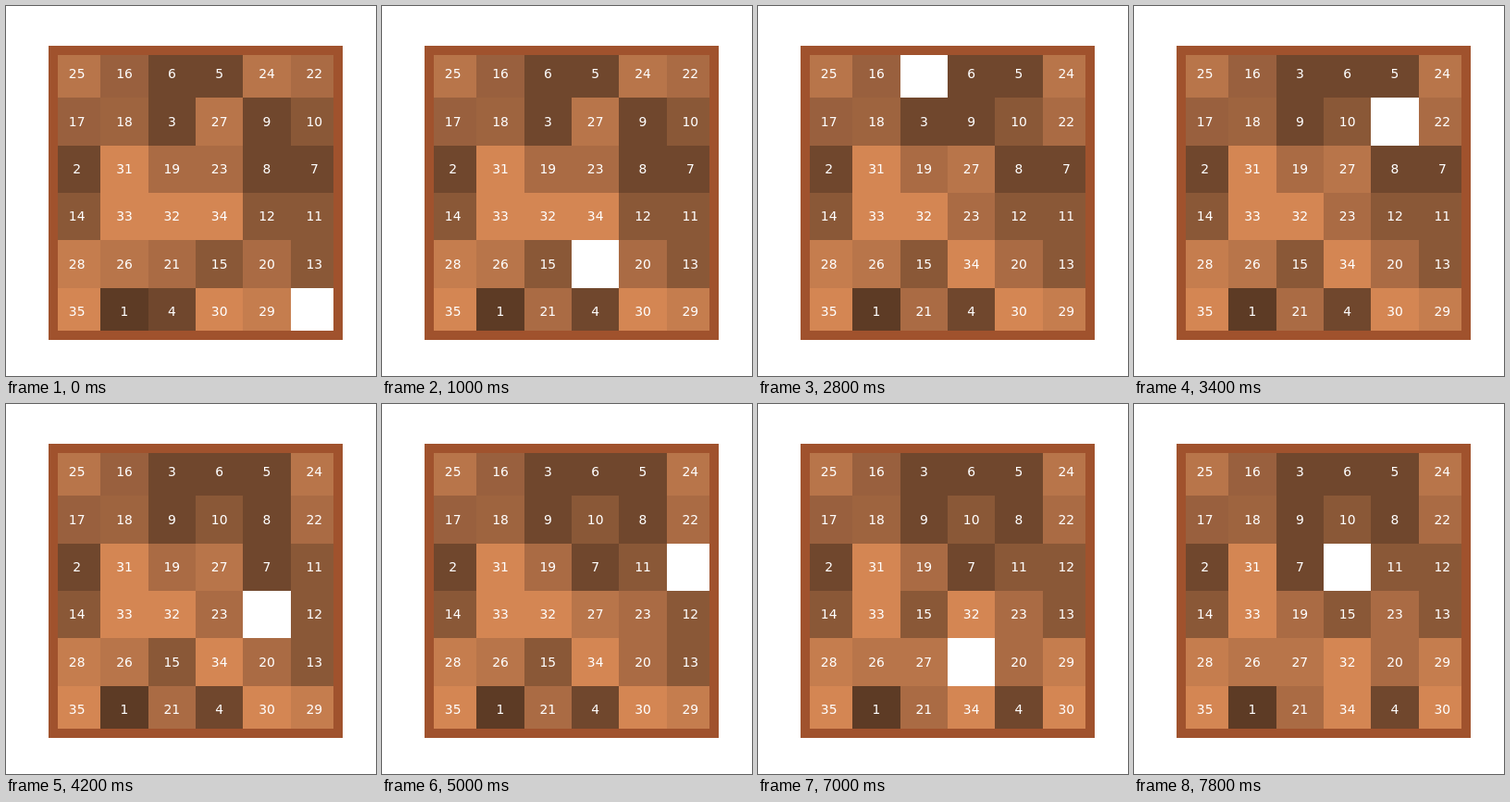
Recreate the animation shown at these times as an HTML page. Size 400 px wide and 400 px high, loop 8000 ms.

```html
<!DOCTYPE html>
<html lang="en">
<head>
<meta charset="utf-8">
<title>Sliding puzzle</title>
<style>
  html, body { margin: 0; width: 100%; height: 100%; overflow: hidden; background: #fff; }
  svg { display: block; width: 100%; height: 100%; }
  rect { shape-rendering: crispEdges; }
  text { font: 13.89px "DejaVu Sans", sans-serif; fill: #fff; text-anchor: middle; }
</style>
</head>
<body>
<svg viewBox="0 0 400 400">
  <g id="tiles"></g>
  <rect x="51" y="48" width="308" height="308" fill="none" stroke="#a0522d" stroke-width="10"/>
</svg>
<script>
const SIZE = 6, LEFT = 51, TOP = 48, PITCH = 308 / SIZE;
const STEP = 200, LOOP = 8000;
const START = [
  25, 16, 6, 5, 24, 22,
  17, 18, 3, 27, 9, 10,
  2, 31, 19, 23, 8, 7,
  14, 33, 32, 34, 12, 11,
  28, 26, 21, 15, 20, 13,
  35, 1, 4, 30, 29, 0
];
// Directions in which the gap travels
const MOVES = 'LLLURUUURRULLLDRRDRDLLURRDDDLLUULDRULUR';
const OFFSET = { L: -1, R: 1, U: -SIZE, D: SIZE };
// Highest number of each shade
const SHADES = [
  [1, '#5d3b25'], [9, '#70472d'], [15, '#8a5837'], [17, '#99603e'], [18, '#9e643f'],
  [23, '#aa6b44'], [27, '#b8754a'], [29, '#c57d4e'], [35, '#d48653']
];

const boards = [START];
for (const move of MOVES) {
  const board = boards[boards.length - 1].slice();
  const gap = board.indexOf(0), next = gap + OFFSET[move];
  board[gap] = board[next];
  board[next] = 0;
  boards.push(board);
}

function add(parent, name, attrs) {
  const node = document.createElementNS('http://www.w3.org/2000/svg', name);
  for (const key in attrs) node.setAttribute(key, attrs[key]);
  return parent.appendChild(node);
}

const layer = document.getElementById('tiles');
const cells = START.map((_, i) => {
  const col = i % SIZE, row = Math.floor(i / SIZE);
  const x = Math.round(LEFT + col * PITCH), y = Math.round(TOP + row * PITCH);
  return {
    tile: add(layer, 'rect', {
      x, y,
      width: Math.round(LEFT + (col + 1) * PITCH) - x,
      height: Math.round(TOP + (row + 1) * PITCH) - y
    }),
    label: add(layer, 'text', {
      x: LEFT + (col + 0.5) * PITCH,
      y: Math.floor(TOP + (row + 0.5) * PITCH) + 5
    })
  };
});

function show(board) {
  board.forEach((number, i) => {
    const { tile, label } = cells[i];
    tile.setAttribute('fill', number ? SHADES.find(([top]) => number <= top)[1] : '#fff');
    label.textContent = number || '';
  });
}

let shown = -1;
function frame() {
  const step = Math.floor(performance.now() % LOOP / STEP);
  if (step !== shown) show(boards[shown = step]);
  requestAnimationFrame(frame);
}
frame();
</script>
</body>
</html>
```
